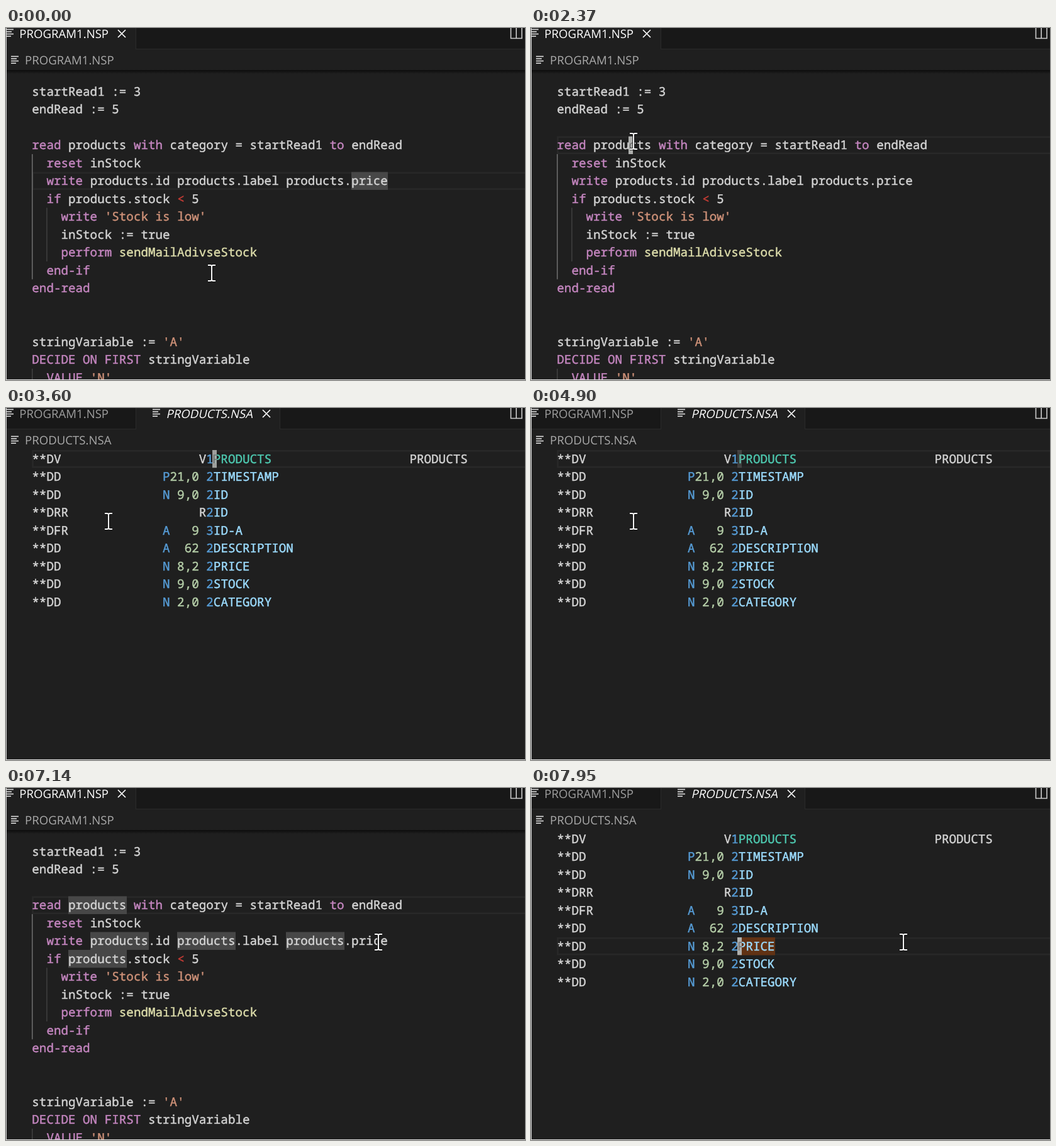
An HTML page for the animation above (8000 ms loop, 825 by 561 pixels).

```html
<!DOCTYPE html>
<html lang="en">
<head>
<meta charset="utf-8">
<title>Go to definition</title>
<style>
  html, body { margin: 0; width: 100%; height: 100%; overflow: hidden; background: #1f1f1f; }
  svg { display: block; }
  text { white-space: pre; text-rendering: geometricPrecision; }
  .code { font-family: "Noto Sans Mono", "DejaVu Sans Mono", monospace; font-size: 19.242px; stroke-width: .45px; }
  .ui { font-family: "Open Sans", "Noto Sans", sans-serif; font-size: 18.6px; }
</style>
</head>
<body>
<svg id="stage" width="825" height="561" viewBox="0 0 825 561"></svg>
<script>
const LOOP = 8000, STEP = 70;
const LEFT = 41.3, CELL = 11.545, LINE = 28.5, BASE = 20.7;

const INK = {
  t: '#d4d4d4', k: '#c586c0', s: '#ce9178', f: '#dcdcaa', r: '#c33c35',
  b: '#569cd6', n: '#b5cea8', v: '#9cdcfe', c: '#4ec9b0'
};

// Each run is a colour key, a bar and the text; runs are parted by "~".
const PROGRAM = [
  't|startRead1 := 3',
  't|endRead := 5',
  '',
  'k|read~t| products ~k|with~t| category = startRead1 ~k|to~t| endRead',
  'k|  reset~t| inStock',
  'k|  write~t| products.id products.label products.price',
  'k|  if~t| products.stock ~r|<~t| 5',
  "k|    write ~s|'Stock is low'",
  't|    inStock := true',
  'k|    perform ~f|sendMailAdivseStock',
  'k|  end-if',
  'k|end-read',
  '',
  '',
  "t|stringVariable := ~s|'A'",
  'k|DECIDE ON FIRST~t| stringVariable',
  "k|  VALUE ~s|'N'"
];

const field = (tag, type, size, level, name) =>
  `t|${tag.padEnd(18)}~b|${type}~n|${size.padStart(4)}~b| ${level}~v|${name}`;
const PRODUCTS = [
  `t|${'**DV'.padEnd(23)}V~b|1~c|PRODUCTS~t|${' '.repeat(19)}PRODUCTS`,
  field('**DD', 'P', '21,0', 2, 'TIMESTAMP'),
  field('**DD', 'N', '9,0', 2, 'ID'),
  `t|${'**DRR'.padEnd(23)}R~b|2~v|ID`,
  field('**DFR', 'A', '9', 3, 'ID-A'),
  field('**DD', 'A', '62', 2, 'DESCRIPTION'),
  field('**DD', 'N', '8,2', 2, 'PRICE'),
  field('**DD', 'N', '9,0', 2, 'STOCK'),
  field('**DD', 'N', '2,0', 2, 'CATEGORY')
];

// Highlights are [row, column, length].
const USES = [[3, 5, 8], [5, 8, 8], [5, 20, 8], [5, 35, 8], [6, 5, 8]];
const PRICE = [[5, 44, 5]];

// caret is [column, covered letter, time it was last placed].
const SCENES = [
  { at: 0, file: 0, row: 5, words: PRICE },
  { at: 2370, file: 0, row: 3, caret: [10, 'c', 2370] },
  { at: 2640, file: 0, row: 3, caret: [10, 'c', 2370], words: USES },
  { at: 2980, file: 1, row: 0, caret: [25, 'P', 2980], words: [[0, 25, 8]] },
  { at: 3260, file: 1, row: 0, caret: [25, 'P', 2980] },
  { at: 5100, file: 0, row: 3, caret: [10, 'c', 5100] },
  { at: 5360, file: 0, row: 3, caret: [10, 'c', 5100], words: USES },
  { at: 7350, file: 0, row: 5, caret: [48, 'e', 7350] },
  { at: 7620, file: 0, row: 5, caret: [48, 'e', 7350], words: PRICE },
  { at: 7950, file: 1, row: 6, caret: [25, 'P', 7950], words: [[6, 25, 5]] }
];
const BUSY = [[2910, 2980], [7890, 7950]];

const stage = document.getElementById('stage');
const colX = c => LEFT + c * CELL;
const rowY = (file, r) => (file ? 67 : 87) + r * LINE;

function add(parent, tag, attrs = {}, text) {
  const el = document.createElementNS('http://www.w3.org/2000/svg', tag);
  for (const key in attrs) el.setAttribute(key, attrs[key]);
  if (text !== undefined) el.textContent = text;
  parent.appendChild(el);
  return el;
}
const box = (parent, x, y, width, height, fill) =>
  add(parent, 'rect', { x, y, width, height, fill });
const label = (parent, x, y, text, fill, slant = 0) =>
  add(parent, 'text', { class: 'ui', fill, transform: `translate(${x} ${y}) skewX(${-slant})` }, text);
const show = (el, on) => el.setAttribute('visibility', on ? 'visible' : 'hidden');

function fileIcon(parent, x, y) {
  [12, 9, 12, 8].forEach((w, i) => box(parent, x, y + i * 3.6, w, 1.7, '#d4d4d4'));
}
function closeIcon(parent, x) {
  add(parent, 'path', { d: `M${x - 6} 3l12 12m0-12l-12 12`, stroke: '#fff', 'stroke-width': 1.7 });
}

function drawCode(parent, file, lines) {
  lines.forEach((line, r) => {
    if (!line) return;
    const text = add(parent, 'text', { class: 'code', x: LEFT, y: rowY(file, r) + BASE });
    for (const run of line.split('~')) {
      const ink = INK[run[0]];
      add(text, 'tspan', { fill: ink, stroke: ink }, run.slice(2));
    }
  });
}

function drawTabs(parent, file) {
  const active = file ? [207, 229] : [0, 206];
  box(parent, 0, 0, 825, 33, '#181818');
  box(parent, 0, 33, 825, 1, '#2b2b2b');
  box(parent, active[0], 0, active[1], 34, '#1f1f1f');
  box(parent, 206, 0, 1, 34, '#2b2b2b');
  fileIcon(parent, 0, 1.5);
  label(parent, 21.3, 16.3, 'PROGRAM1.NSP', file ? '#9d9d9d' : '#fff');
  if (file) {
    box(parent, 435, 0, 1, 34, '#2b2b2b');
    fileIcon(parent, 233, 1.5);
    label(parent, 254.5, 16.3, 'PRODUCTS.NSA', '#fff', 12);
  }
  closeIcon(parent, file ? 414 : 184);
  add(parent, 'path', { d: 'M802.5-2V16.5H820V-2M811.2-2V16.5', fill: 'none', stroke: '#ccc', 'stroke-width': 1.6 });
  fileIcon(parent, 8, 44.5);
  label(parent, 30, 58, file ? 'PRODUCTS.NSA' : 'PROGRAM1.NSP', '#a9a9a9');
}

box(stage, 0, 0, 825, 561, '#1f1f1f');
const fade = add(add(stage, 'defs'), 'linearGradient', { id: 'shade', x2: 0, y2: 1 });
add(fade, 'stop', { offset: 0, 'stop-color': '#000', 'stop-opacity': .6 });
add(fade, 'stop', { offset: 1, 'stop-color': '#000', 'stop-opacity': 0 });

const current = add(stage, 'rect', {
  x: 42.5, width: 790, height: LINE - 2.6, fill: 'none', stroke: '#282828', 'stroke-width': 2.6
});
const marks = USES.map(() => box(stage, 0, 0, 0, LINE, '#474747'));
const files = [PROGRAM, PRODUCTS].map((lines, file) => {
  const g = add(stage, 'g');
  if (!file) {
    box(g, 41, 201, 1.5, 199.5, '#707070');
    box(g, 64.2, 286.5, 1.5, 85.5, '#404040');
    box(g, 41, 543, 1.5, 18, '#404040');
    box(g, 0, 67, 825, 6, 'url(#shade)');
  }
  drawCode(g, file, lines);
  drawTabs(g, file);
  return g;
});

const caret = add(stage, 'svg', { width: 7, height: LINE, overflow: 'hidden' });
box(caret, 0, 0, 7, LINE, '#aeafad');
const covered = add(caret, 'text', { class: 'code', x: 0, y: BASE, fill: '#707070' }, '');

const loading = box(stage, 1, 31, 6, 2.5, '#0078d4');
const beam = add(stage, 'g', { fill: 'none' });
const beamPath = 'M-6-12h3.5q2.5 0 2.5 2q0-2 2.5-2h3.5M0-10V11M-6 13h3.5q2.5 0 2.5-2q0 2 2.5 2h3.5';
add(beam, 'path', { d: beamPath, stroke: '#111', 'stroke-width': 3.6 });
add(beam, 'path', { d: beamPath, stroke: '#fff', 'stroke-width': 1.9 });
const arrow = add(stage, 'path', {
  d: 'M0 0V23.5L5.3 18.5 9 27 12.8 25.3 9.2 17H16.5Z', fill: '#fff', stroke: '#000', 'stroke-width': 1.2
});
box(stage, 0, 0, 1, 561, '#d8d8d8');
box(stage, 0, 560, 825, 1, '#e0e0e0');

const smooth = p => p * p * (3 - 2 * p);
const clamp = p => Math.max(0, Math.min(1, p));
const curve = (a, b, c, p) => a.map((v, i) =>
  v * (1 - p) ** 2 + 2 * b[i] * p * (1 - p) + c[i] * p * p);
const stepped = (t, start) => clamp(Math.floor((t - start) / STEP) / 11);

function pointer(t) {
  if (t < 1400) return [327, 390];
  if (t < 6230) {
    const p = stepped(t, 1400);
    return curve([262, 357], [185, 255], [163, 180], 1 - (1 - p) ** 2);
  }
  const p = (stepped(t, 6230) * 11 + 1) / 12;
  return curve([163, 180], [450, 295], [592, 245], smooth(p));
}

// Solid at first, then a soft blink that runs forth and back.
function caretAlpha(age) {
  const turn = Math.max(0, age - 430) / 555 % 2;
  const p = turn > 1 ? 2 - turn : turn;
  return 1 - smooth(clamp((p - .2) / .7));
}

function render(t) {
  const scene = SCENES.filter(s => s.at <= t).pop();
  const { file, row, words = [] } = scene;
  const top = rowY(file, row);
  files.forEach((g, i) => show(g, i === file));
  current.setAttribute('y', top + 1.3);
  marks.forEach((el, i) => {
    show(el, i < words.length);
    if (i >= words.length) return;
    const [r, c, n] = words[i];
    const x = Math.round(colX(c));
    el.setAttribute('x', x);
    el.setAttribute('y', rowY(file, r));
    el.setAttribute('width', Math.ceil(n * CELL));
    el.setAttribute('fill', file ? '#613214' : '#474747');
  });

  show(caret, !!scene.caret);
  if (scene.caret) {
    const [col, letter, placed] = scene.caret;
    caret.setAttribute('x', Math.round(colX(col) - 1.7));
    caret.setAttribute('y', top);
    caret.setAttribute('opacity', caretAlpha(t - placed));
    covered.textContent = letter;
  }

  const busy = BUSY.some(([from, to]) => t >= from && t < to);
  const [x, y] = pointer(t);
  show(beam, !busy);
  show(arrow, busy);
  show(loading, busy);
  beam.setAttribute('transform', `translate(${x} ${y})`);
  arrow.setAttribute('transform', `translate(${x - 2} ${y - 2})`);
}

const begin = performance.now();
function tick() {
  render((performance.now() - begin) % LOOP);
  requestAnimationFrame(tick);
}
tick();
</script>
</body>
</html>
```
